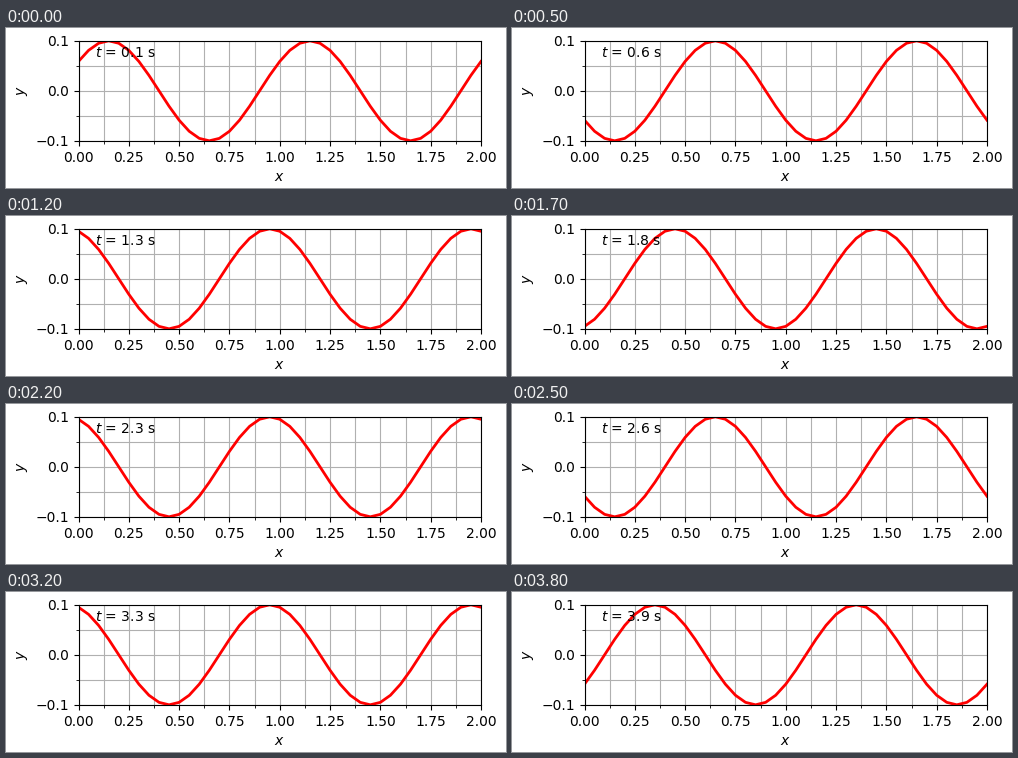
Write a matplotlib script that moves like this. It is 500 by 160 pixels and loops after 3900 ms.

```python
import numpy as np
import matplotlib.pyplot as plt
from matplotlib.animation import FuncAnimation
from matplotlib.ticker import MultipleLocator

W, H, DPI = 500, 160, 100
FRAMES, INTERVAL = 39, 100
AMPLITUDE, WAVELENGTH, PERIOD = 0.1, 1.0, 1.0

plt.rcParams["font.family"] = "DejaVu Sans"

fig, ax = plt.subplots(figsize=(W / DPI, H / DPI), dpi=DPI, facecolor="white")
fig.subplots_adjust(left=0.145, right=0.95, top=0.92, bottom=0.295)
ax.set(xlim=(0, 2), ylim=(-0.1, 0.1), xlabel="$x$", ylabel="$y$")
for axis, step in ((ax.xaxis, 0.25), (ax.yaxis, 0.1)):
    axis.set_major_locator(MultipleLocator(step))
    axis.set_minor_locator(MultipleLocator(step / 2))
ax.xaxis.set_major_formatter("{x:.2f}")
ax.yaxis.set_major_formatter("{x:.1f}")
ax.grid(which="both")

x = np.linspace(0, 2, 41)
wave, = ax.plot(x, np.zeros_like(x), color="red", lw=2)
clock = ax.text(0.08, 0.068, "")


def update(i):
    t = (i + 1) * INTERVAL / 1000
    # wave travelling towards negative x
    wave.set_ydata(AMPLITUDE * np.sin(2 * np.pi * (t / PERIOD + x / WAVELENGTH)))
    clock.set_text(f"$t$ = {t:.1f} s")
    return wave, clock


anim = FuncAnimation(fig, update, frames=FRAMES, interval=INTERVAL,
                     repeat=True, repeat_delay=0)
plt.show()
```
